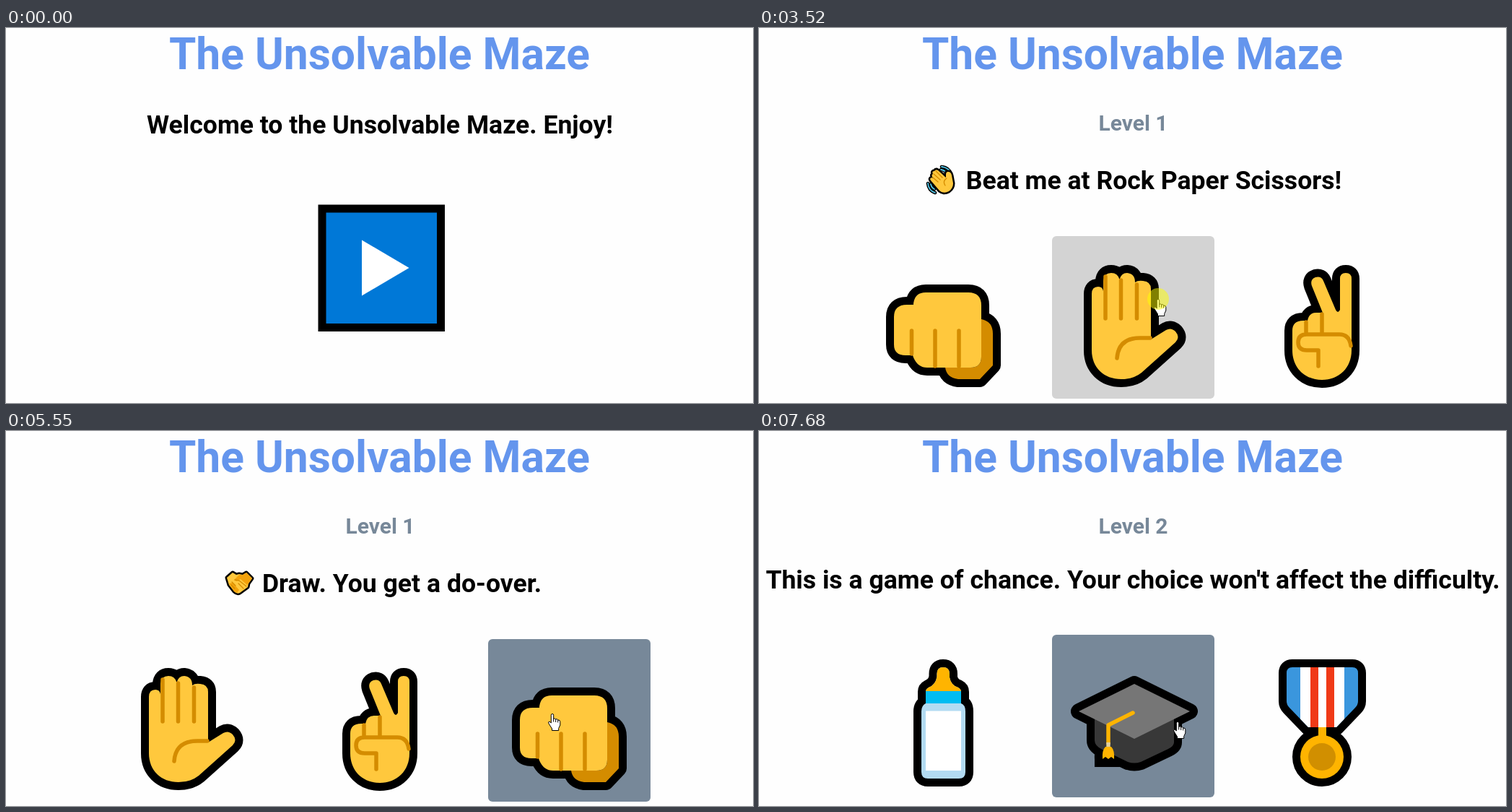
These frames come from a looping animation (1035x519 px, 8 s). An HTML page:

```html
<!DOCTYPE html>
<html lang="en">
<head>
<meta charset="utf-8">
<title>The Unsolvable Maze</title>
<style>
  html, body { margin: 0; width: 100%; height: 100%; overflow: hidden; background: #fefefe; }
  svg { display: block; width: 1035px; height: 519px; }
  text { font: 700 35.6px Roboto, "Liberation Sans", sans-serif; text-anchor: middle; }
  .title { font-size: 60.5px; fill: #6495ed; }
  .level { font-size: 30px; fill: #778899; }
  .ink { fill: #000; stroke: #000; stroke-width: 22; stroke-linejoin: round; }
  .small .ink { stroke-width: 5; }
  .line { fill: none; stroke: #d48c00; stroke-width: 5.5; stroke-linecap: round; stroke-linejoin: round; }
  .small .line { stroke-width: 1.3; }
</style>
</head>
<body>
<svg id="stage" viewBox="0 0 1035 519"></svg>
<script>
const YELLOW = '#ffc83d', OCHRE = '#d48c00', AMBER = '#ffb400';
const HOVER = '#778899', PRESSED = '#d3d3d3';
const TILE_X = [143, 406, 668], TILE_SIZE = 225;

const fill = (d, color) => `<path d="${d}" fill="${color}"/>`;
const line = d => `<path class="line" d="${d}"/>`;
const rect = (x, y, w, h, color) =>
  `<rect x="${x}" y="${y}" width="${w}" height="${h}" fill="${color}"/>`;

// Black contour behind all parts, then the coloured parts on top.
const outlined = parts =>
  `<path class="ink" d="${parts.map(p => p[0]).join('')}"/>` +
  parts.map(p => fill(...p)).join('');

const RIBBON = 'M63 53Q63 45 71 45H154Q162 45 162 53V92Q162 97 158 101L132 128H93L67 101Q63 97 63 92Z';
const TEAT = 'M103.5 58V54Q103.5 45 112 45Q121 45 121 54V59Q123 70 133 73Q137 75 137 79';

const icons = {
  play: rect(26.5, 35.5, 175.5, 175.5, '#000') + rect(37.5, 46.5, 153.5, 153.5, '#0078d7') +
    fill('M87 84.5L152.5 123L87 161.5Z', '#fff'),

  rock: outlined([
    ['M165 115Q181 118 181 135V179L163 198H133Q117 196 115 182H150Q165 182 165 167Z', OCHRE],
    ['M44 112Q44 95 62 95H71V93Q73 78 88 78H147Q165 78 165 96V167Q165 182 150 182H90Q77 182 71 168L70 165H60Q44 165 44 150Z', YELLOW]
  ]) + line('M68.5 131V163M101 131V180M134 131V180'),

  paper: outlined([
    ['M55 80Q55 70 64 70Q70 70 71 76V62Q72 51 82 51Q91 51 93.5 60Q96 51 104 51Q115 52 115 64Q119 61 126 62Q137 63 137 73V143L158 130Q165 126 171 132Q178 140 171 147L124 189Q113 198 96 198C72 198 55 182 55 158Z', YELLOW]
  ]) + line('M74 56V114M95.5 61V114M117.5 67V114M90 169Q92 141 122 141H136'),

  scissors: outlined([
    ['M71 131Q71 117 86 117H92Q94 106 104 106H113L98 69Q95 60 103 57Q111 55 114 62L131 102Q134 108 137 102V59Q137 51 145 51Q153 51 153 59V158C153 182 136 199 112 199C88 199 71 182 71 158Z', YELLOW]
  ]) + line('M90 119V135M112 108V135M152 152Q150 136 136 136H91Q79 136 79 147Q79 158 91 158H107V180'),

  bottle: outlined([
    [`${TEAT}V95Q143 97 143 106V190Q143 199 134 199H91Q82 199 82 190V106Q82 98 88 95V79Q88 75 92 73Q102 69 103.5 58Z`, '#b3dbf2']
  ]) + fill(`${TEAT}H88Q88 75 92 73Q102 69 103.5 58Z`, AMBER) +
    rect(88, 78, 49, 17, '#00bcf2') + rect(88, 105.5, 49, 82.5, '#fff'),

  cap: rect(59, 164, 35, 19, '#000') + outlined([
    ['M59 110H169V149Q169 154 161 158L123 176Q114 179 105 176L70 159Q59 154 59 146Z', '#383838'],
    ['M37 106L114 68L191 106L114 144Z', '#767676'],
    ['M74 155H82Q87 160 86 172L82 169L78 172L74 169L70 172Q69 160 74 155Z', AMBER]
  ]) +
    '<path d="M112 108L78 125V150" fill="none" stroke="#ffb400" stroke-width="5.5" stroke-linecap="round" stroke-linejoin="round"/>' +
    rect(75.3, 149, 5.4, 6, '#e0cfa0'),

  medal: outlined([
    ['M107 126H118V142H107Z', AMBER],
    ['M82 169a30 30 0 0 1 60 0a30 30 0 0 1-60 0Z', AMBER],
    [RIBBON, '#3a96dd']
  ]) + `<clipPath id="ribbon"><path d="${RIBBON}"/></clipPath><g clip-path="url(#ribbon)">` +
    rect(82, 45, 61, 84, '#fff') + rect(96, 45, 11, 84, '#f03a17') + rect(118, 45, 11, 84, '#f03a17') +
    '</g>' + rect(107, 128, 11, 14, AMBER) + '<circle cx="112" cy="169" r="19" fill="#d18f00"/>'
};

const ARCS = 'M253 192Q263 193 266 202M252 196Q258 197 260 201M234 215Q235 225 244 228M238 216Q239 221 243 223';
const stroke = (d, color, width) =>
  `<path d="${d}" fill="none" stroke="${color}" stroke-width="${width}" stroke-linecap="round"/>`;

const wave = '<g class="small">' + stroke(ARCS, '#000', 4.6) + stroke(ARCS, '#50c4e6', 1.8) +
  outlined([['M238 211Q236 208 239 207L241 208Q238 203 241 202Q239 198 243 198Q245 195 248 197L259 207V203Q259 199 262 199Q266 199 267 204L269 215Q269 222 263 226Q256 230 250 225Z', YELLOW]]) +
  line('M241 207L248 213M242 202L251 210M245 198L254 207M260 208Q254 212 258 218') + '</g>';

const handshake = '<g class="small">' + outlined([
  ['M306 203L314 196L319 199L323 198L328 199L333 196L341 204L336 211L335 216L324 224Q320 226 316 222L309 213Z', YELLOW],
  ['M323 199L328 199L333 196L341 204L336 211L334 213L325 205L319 208L316 206Z', '#f2a20c'],
  ['M309 211L314 210L323 220L320 224L316 222Z', '#f2a20c']
]) + line('M317 206L323 207L333 215M322 211L329 218M313 209L318 214M312 213L317 218') + '</g>';

const pages = [
  { start: 0, live: 0, top: 209, icons: [, 'play'],
    head: '<text x="518" y="146">Welcome to the Unsolvable Maze. Enjoy!</text>' },
  { start: 1410, live: 1640, top: 288, level: 1, icons: ['rock', 'paper', 'scissors'],
    head: wave + '<text x="547" y="223">Beat me at Rock Paper Scissors!</text>' },
  { start: 3850, live: 5040, top: 288, level: 1, icons: ['paper', 'scissors', 'rock'],
    head: handshake + '<text x="548.5" y="223">Draw. You get a do-over.</text>' },
  { start: 6480, live: 7040, top: 282, level: 2, icons: ['bottle', 'cap', 'medal'],
    head: '<text x="518" y="218">This is a game of chance. Your choice won\'t affect the difficulty.</text>' }
];

const pageMarkup = page => '<g class="page">' +
  (page.level ? `<text class="level" x="518.5" y="142">Level ${page.level}</text>` : '') + page.head +
  page.icons.map((name, i) => `<g transform="translate(${TILE_X[i]} ${page.top})">${icons[name]}</g>`).join('') +
  '</g>';

const stage = document.getElementById('stage');
stage.innerHTML =
  '<rect width="1035" height="519" fill="#fefefe"/>' +
  '<text class="title" x="517.5" y="56.5">The Unsolvable Maze</text>' +
  `<rect id="tile" width="${TILE_SIZE}" height="${TILE_SIZE}" rx="6"/>` +
  pages.map(pageMarkup).join('') +
  `<g id="cursor" stroke="#000" fill="#fff">
    <path id="arrow" d="M.5 .5V16.5L4.2 13L6.7 18.6L9 17.6L6.6 12H11.8Z"/>
    <g id="hand">
      <path d="M-1.7 1.3Q-1.7-.5 0-.5Q1.7-.5 1.7 1.3V6.2Q4 5.2 4.7 7Q7 5.8 7.7 8Q10.8 7.6 10.8 10.5V15L8.7 19.5V22.5H-.5V20L-4.9 13Q-6.4 10.3-4 10L-1.7 12Z"/>
      <path d="M1.7 6V10.5M4.7 7V11M7.7 8V11.5" fill="none"/>
    </g>
  </g>
  <circle id="click" r="15" fill="#ff0" fill-opacity=".5"/>`;

const [tile, cursor, arrow, hand, click] =
  ['tile', 'cursor', 'arrow', 'hand', 'click'].map(id => document.getElementById(id));
const groups = [...stage.querySelectorAll('.page')];

const easeOut = p => 1 - (1 - p) ** 2;
const easeInOut = p => p * p * (3 - 2 * p);
const moves = [
  { start: 590, end: 1010, steps: 15, from: [835, 525], to: [553, 376], ease: easeOut },
  { start: 5040, end: 5550, steps: 18, from: [553, 376], to: [757, 392], ease: easeInOut },
  { start: 7040, end: 7680, steps: 20, from: [757, 392], to: [580, 403], ease: easeInOut }
];
const presses = [1240, 3520, 6340], PRESS_TIME = 70;

const show = (el, on) => el.setAttribute('display', on ? 'inline' : 'none');

function pointerAt(t) {
  const move = moves.filter(m => t >= m.start).pop();
  if (!move) return null;
  const { start, end, steps, from, to, ease } = move;
  const done = Math.floor((t - start) / (end - start) * (steps - 1) + 1e-6) + 1;
  const p = ease(Math.min(1, done / steps));
  return from.map((v, i) => Math.round(v + (to[i] - v) * p));
}

function render(t) {
  const page = pages.filter(p => t >= p.start).pop();
  groups.forEach((g, i) => show(g, pages[i] === page));

  const pos = pointerAt(t);
  const [x, y] = pos || [-99, -99];
  const over = TILE_X.findIndex((left, i) => page.icons[i] &&
    x >= left && x < left + TILE_SIZE && y >= page.top && y < page.top + TILE_SIZE);
  const pressed = presses.some(s => t >= s && t < s + PRESS_TIME);

  show(tile, over >= 0 && t >= page.live);
  if (over >= 0) {
    tile.setAttribute('x', TILE_X[over]);
    tile.setAttribute('y', page.top);
    tile.setAttribute('fill', pressed ? PRESSED : HOVER);
  }

  show(cursor, pos);
  cursor.setAttribute('transform', `translate(${x} ${y})`);
  show(hand, over >= 0);
  show(arrow, over < 0);
  show(click, pressed);
  click.setAttribute('cx', x);
  click.setAttribute('cy', y - 1);
}

const origin = performance.now();
function tick() {
  render((performance.now() - origin) % 8000);
  requestAnimationFrame(tick);
}
tick();
</script>
</body>
</html>
```
